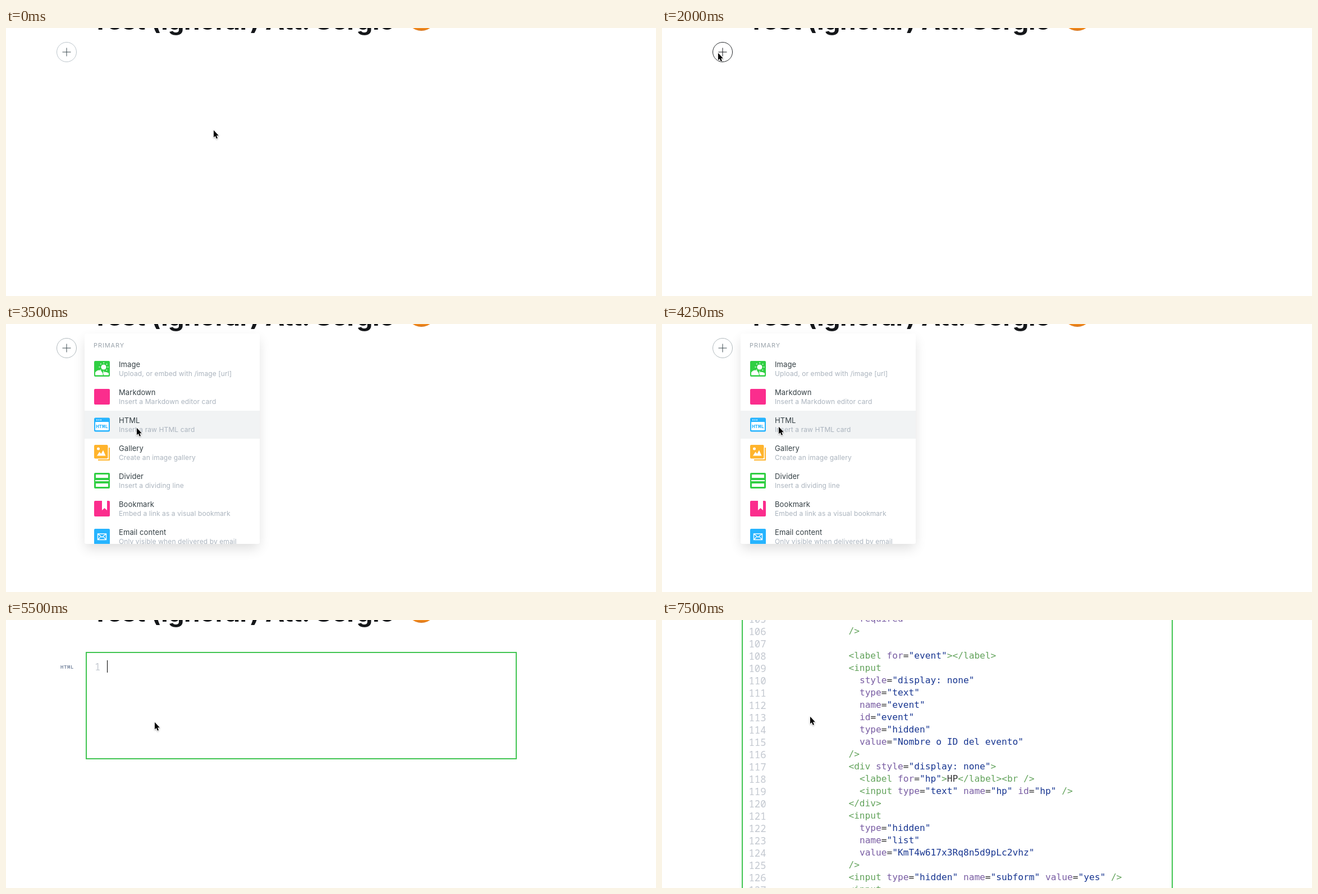
These frames come from a looping animation (1158 by 479 pixels, 8 s). An HTML page:

```html
<!DOCTYPE html>
<html lang="en">
<head>
<meta charset="utf-8">
<title>Editor card menu</title>
<style>
  html, body { margin: 0; width: 100%; height: 100%; overflow: hidden; background: #fff; }
  svg { display: block; width: 100%; height: 100%; }
  text { white-space: pre; font-family: Inter, sans-serif; }
  .title { font-size: 46px; font-weight: 700; letter-spacing: -.5px; fill: #15171a; }
  .head { font-size: 11px; letter-spacing: .9px; fill: #9aa3ab; }
  .name { font-size: 13px; letter-spacing: .1px; fill: #343f44; }
  .desc { font-size: 12px; letter-spacing: .1px; fill: #abb4be; }
  .code { font: 16.18px "DejaVu Sans Mono", monospace; fill: #333; }
  .num { font: 17.3px "Noto Sans Mono", monospace; fill: #c3c8d0; }
  .label { font: 700 9px "Noto Sans Mono", monospace; letter-spacing: .6px; fill: #8492a8; }
  .badge { font: 700 9px "Noto Sans Mono", monospace; fill: #26b4ff; }
  .tag { fill: #63a35c; }
  .attr { fill: #795da3; }
  .str { fill: #183691; }
</style>
</head>
<body>
<svg id="stage" viewBox="0 0 1158 479">
  <defs>
    <linearGradient id="orange" x1="0" y1="0" x2="0" y2="1">
      <stop offset=".75" stop-color="#fb9f2c"/>
      <stop offset=".92" stop-color="#f28a1c"/>
      <stop offset="1" stop-color="#d2701b"/>
    </linearGradient>
    <filter id="soft" x="-20%" y="-20%" width="140%" height="140%">
      <feGaussianBlur stdDeviation="11"/>
    </filter>
    <filter id="drop" x="-50%" y="-50%" width="200%" height="200%">
      <feDropShadow dx="0" dy="1" stdDeviation=".8" flood-opacity=".35"/>
    </filter>
    <clipPath id="menuClip"><rect x="140" y="17" width="312" height="376" rx="3"/></clipPath>
  </defs>

  <g id="heading">
    <text class="title" x="152.8" y="2.8">Test (Ignorar) Att. Sergio</text>
    <circle cx="740" cy="-22" r="27" fill="url(#orange)"/>
  </g>

  <g id="plus" fill="none">
    <circle id="ring" cx="108" cy="43" r="17.5" fill="#fff"/>
    <path id="cross" d="M100.5 43h15M108 35.5v15"/>
  </g>
  <rect id="caret" x="156" y="32" width="1" height="22" fill="#15171a"/>

  <g id="menu">
    <rect x="142" y="28" width="308" height="373" rx="4" opacity=".13" filter="url(#soft)"/>
    <rect x="140" y="17" width="312" height="376" rx="3" fill="#fff"/>
    <g clip-path="url(#menuClip)">
      <rect id="hover" x="140" y="155" width="312" height="50" fill="#f1f3f4"/>
      <text class="head" x="156" y="42">PRIMARY</text>
      <g id="items"></g>
    </g>
  </g>

  <g id="card">
    <rect x="143" y="58" width="766" height="190" fill="#fff" stroke="#41c552" stroke-width="2"/>
    <text class="label" x="97" y="87">HTML</text>
    <text class="num" x="158" y="90">1</text>
    <rect id="codeCaret" x="180" y="72" width="1" height="22"/>
  </g>

  <g id="listing">
    <path d="M143 0V479M909 0V479" stroke="#41c552" stroke-width="2"/>
  </g>

  <g id="cursor" filter="url(#drop)">
    <path d="M1 .7v12.9l2.8-2.6 2.1 4.8 2.1-.9-2-4.7h3.9z" stroke="#fff" stroke-width="1.6"
      stroke-linejoin="round" paint-order="stroke"/>
  </g>
</svg>

<script>
const $ = id => document.getElementById(id);

function add(parent, tag, attrs, content) {
  const el = document.createElementNS("http://www.w3.org/2000/svg", tag);
  for (const key in attrs) el.setAttribute(key, attrs[key]);
  if (content) el.textContent = content;
  parent.appendChild(el);
  return el;
}

const GREEN = "#30cf43", PINK = "#fb2d8d", BLUE = "#26b4ff", YELLOW = "#ffb42c";
const tile = color => `<rect width="28" height="28" rx="2" fill="${color}"/>`;

// Icons live in a 28 by 28 box
const icons = {
  image: tile(GREEN) +
    `<circle cx="17" cy="11" r="4.6" fill="#fff"/>
     <circle cx="17" cy="11" r="7.6" fill="none" stroke="#fff" stroke-width="1.8"
       stroke-linecap="round" stroke-dasharray=".01 5.96"/>
     <path d="M2 25.5v-5q3-4 7-4 5 0 7 9zM17 25.5q-.4-3-1.6-4.7 5-2.5 10.6 1v3.7z" fill="#fff"/>`,
  markdown: tile(PINK),
  html:
    `<rect y="1.5" width="28" height="25" rx="2.5" fill="${BLUE}"/>
     <path d="M4 5.5h2M7.5 5.5h2M11 5.5h2" stroke="#fff" stroke-width="1.6"/>
     <rect x="2" y="9" width="24" height="15" rx="1" fill="#fff"/>
     <text class="badge" x="3.2" y="20">HTML</text>`,
  gallery:
    `<rect width="24.5" height="24.5" rx="2" fill="${YELLOW}"/>
     <path d="M27 5v22H7" fill="none" stroke="${YELLOW}" stroke-width="2"/>
     <circle cx="7.5" cy="7" r="2.5" fill="#fff"/>
     <path d="M5 19.5l4.5-7 3 3.5 3.5-6.5 4.5 10z" fill="#fff"/>`,
  divider: tile(GREEN) +
    `<path d="M3 3h22v6H3zM3 19h22v6H3zM2 13h24v2H2z" fill="#fff"/>`,
  bookmark: tile(PINK) +
    `<path d="M14 0h9v17l-4.5-4-4.5 4z" fill="#fff"/>`,
  email: tile(BLUE) +
    `<path d="M6.5 9h15v10.5h-15zM6.5 9l7.5 6 7.5-6M6.5 19.5l5-5M21.5 19.5l-5-5"
       fill="none" stroke="#fff" stroke-width="1.4"/>`
};

[
  ["image", "Image", "Upload, or embed with /image [url]"],
  ["markdown", "Markdown", "Insert a Markdown editor card"],
  ["html", "HTML", "Insert a raw HTML card"],
  ["gallery", "Gallery", "Create an image gallery"],
  ["divider", "Divider", "Insert a dividing line"],
  ["bookmark", "Bookmark", "Embed a link as a visual bookmark"],
  ["email", "Email content", "Only visible when delivered by email"]
].forEach(([icon, name, desc], i) => {
  const y = 66 + 50 * i;
  add($("items"), "g", { transform: `translate(157 ${y})` }).innerHTML = icons[icon];
  add($("items"), "text", { class: "name", x: 201, y: y + 11 }, name);
  add($("items"), "text", { class: "desc", x: 201, y: y + 27 }, desc);
});

const source = `  required
/>

<label for="event"></label>
<input
  style="display: none"
  type="text"
  name="event"
  id="event"
  type="hidden"
  value="Nombre o ID del evento"
/>
<div style="display: none">
  <label for="hp">HP</label><br />
  <input type="text" name="hp" id="hp" />
</div>
<input
  type="hidden"
  name="list"
  value="KmT4w617x3Rq8n5d9pLc2vhz"
/>
<input type="hidden" name="subform" value="yes" />
<input`;

const token = /("[^"]*")|(<\/?[a-z]+|\/?>)|([a-z]+(?==)|required)|[^]/g;

source.split("\n").forEach((line, i) => {
  const y = 3 + 22 * i;
  add($("listing"), "text", { class: "num", x: 154.5, y: y + 2 }, String(105 + i));
  const row = add($("listing"), "text", { class: "code", x: 332.4, y });
  for (const [part, str, tag, attr] of line.matchAll(token))
    add(row, "tspan", { class: str ? "str" : tag ? "tag" : attr ? "attr" : "" }, part);
});

// Pointer stops: time, x, y
const stops = [
  [0, 369, 182], [250, 99, 89], [500, 77, 75], [1000, 82, 70], [1250, 99, 41],
  [1500, 99, 44], [3000, 94, 47], [3250, 124, 143], [3500, 232, 185],
  [3750, 196, 173], [4000, 303, 182], [4250, 207, 183], [4500, 264, 182],
  [6000, 263, 172]
];

// Button colours: time, ring, cross
const tones = [
  [0, "#bcc5cb", "#3c4a51"], [1500, "#6d7377", "#2c353a"], [1750, "#25282b", "#15171a"],
  [3250, "#72797d", "#2c353a"], [3500, "#b0b9bd", "#3c4a51"]
];

const latest = (list, t) => list.filter(item => item[0] <= t).pop();
const show = (id, on) => $(id).setAttribute("display", on ? "inline" : "none");

function draw(t) {
  const within = (a, b) => t >= a && t < b;
  const [, x, y] = latest(stops, t);
  const [, ring, cross] = latest(tones, t);
  $("cursor").setAttribute("transform", `translate(${x} ${y})`);
  $("ring").setAttribute("stroke", ring);
  $("cross").setAttribute("stroke", cross);
  show("heading", t < 6750);
  show("plus", t < 5500);
  show("caret", within(1500, 2000));
  show("menu", within(2500, 5500));
  show("hover", t >= 3500);
  show("card", within(5500, 6750));
  show("codeCaret", !within(6000, 6500));
  show("listing", t >= 6750);
}

const start = performance.now();
function tick() {
  draw((performance.now() - start) % 8000);
  requestAnimationFrame(tick);
}
tick();
</script>
</body>
</html>
```
